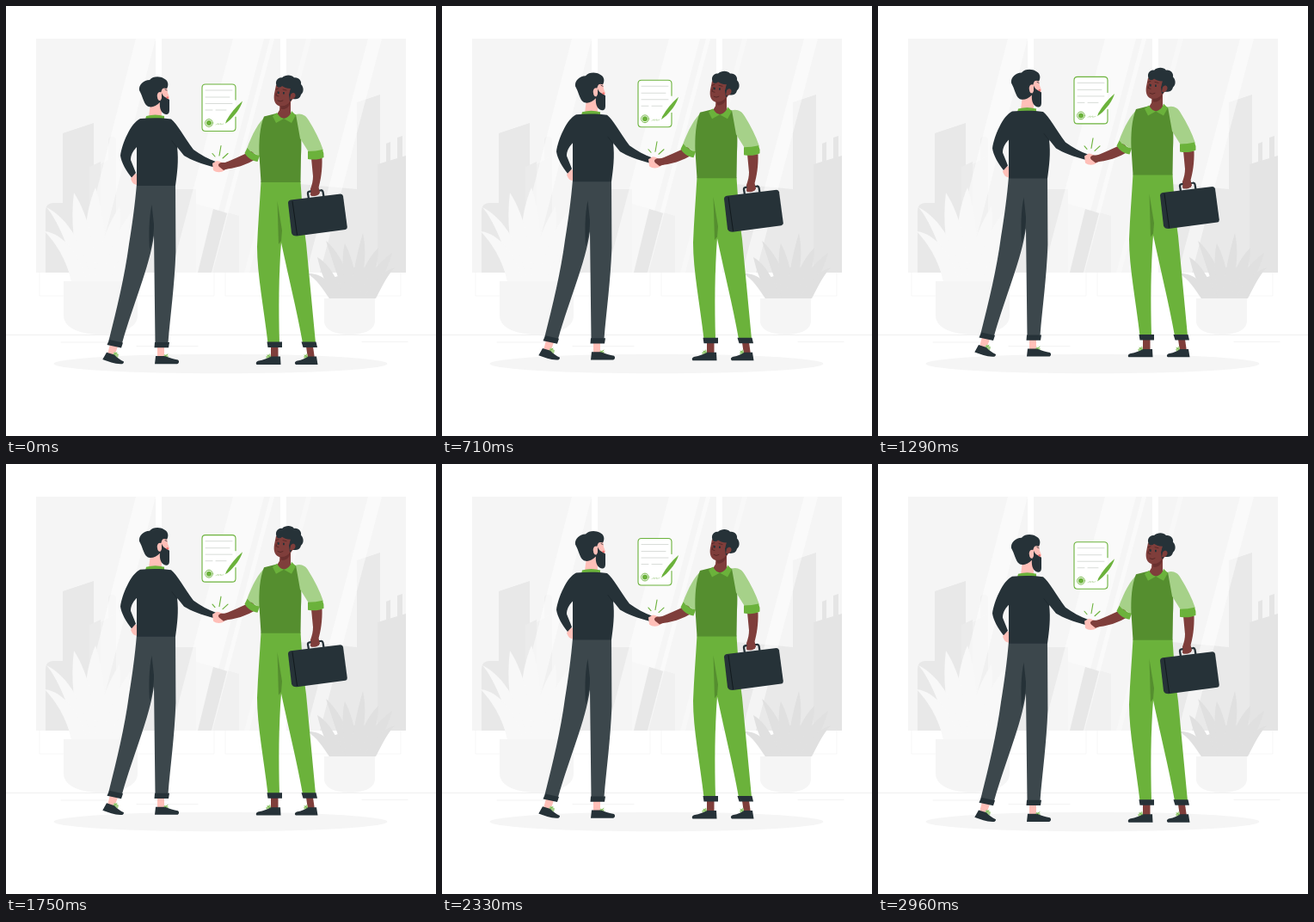
Animation of 500 by 500 pixels, one loop 3 s. Source, as an HTML page:

```html
<!DOCTYPE html>
<html lang="en">
<head>
<meta charset="utf-8">
<title>Handshake</title>
<style>
  html, body { margin: 0; width: 100%; height: 100%; overflow: hidden; background: #fff; }
  svg { display: block; width: 100%; height: 100%; }
  .dark { fill: #263238; }
  .green { fill: #6bb23b; }
  .moss { fill: #558e2f; }
  .pale { fill: #a6d189; }
  .pink { fill: #ffbfb8; }
  .brown { fill: #7f3e3b; }
  .slate { fill: #3c474c; }
  .line { fill: none; stroke-linecap: round; stroke-linejoin: round; }
</style>
</head>
<body>
<svg viewBox="0 0 500 500">
  <defs><clipPath id="pane"><rect x="35" y="38" width="430" height="272"/></clipPath></defs>

  <g clip-path="url(#pane)">
    <rect x="35" y="38" width="430" height="272" fill="#f5f5f5"/>
    <g fill="#ebebeb">
      <path d="M66 148L102 136V310H66Z" fill="#e8e8e8"/>
      <path d="M97 187L110 181V310H97Z"/>
      <path d="M119 155Q119 152 123.500 152Q128 152 128 155V310H119Z" fill="#f0f0f0"/>
      <path d="M46 238Q46 229 56 229H104V310H46Z" fill="#e8e8e8"/>
      <path d="M110 184L128 174V310H110Z" fill="#f0f0f0"/>
      <path d="M160 213H221V310H160Z"/>
      <path d="M221 230L271 244V310H221Z" fill="#f0f0f0"/>
      <path d="M342 207L408 213V310H342Z" fill="#e9e9e9"/>
      <path d="M408 112L435 103V310H408Z" fill="#e9e9e9"/>
      <path d="M442 160L447 158V310H442ZM455 153L461 151V310H455Z" fill="#e5e5e5"/>
      <path d="M432 184L465 174V310H432Z" fill="#e4e4e4"/>
    </g>
    <g fill="#fff" opacity=".5">
      <path d="M151 38H174L104 310H81Z"/>
      <path d="M264 38H300L228 310H192Z"/>
      <path d="M307 38H312L240 310H235Z"/>
      <path d="M349 38H355L283 310H277Z" opacity=".5"/>
      <path d="M421 38H437L365 310H349Z"/>
    </g>
    <path d="M241 236L257 241L239 310H223Z" fill="#e7e7e7"/>
    <path d="M174 38H181V310H174ZM319 38H326V310H319Z" fill="#fff"/>
  </g>

  <g class="line" stroke="#f5f5f5" stroke-width=".8">
    <path d="M39 310V337H242V310M255 310V337H459V310"/>
    <path d="M0 382.500H500" stroke="#ebebeb"/>
    <path d="M64 391H118M152 395.500H223M414 390.500H467" stroke="#f0f0f0"/>
  </g>

  <g fill="#f8f8f8">
    <path d="M67 320H153V360C153 375 132 382 110 382S67 375 67 360Z" fill="#f5f5f5"/>
    <path d="M76 320L70 296L90 284L104 264L120 278L138 288L146 320Z"/>
    <path d="M98 320C88 276 92 239 104 211C114 241 119 279 111 320Z"/>
    <path d="M91 320C78 285 75 249 79 217C96 244 105 282 104 320Z"/>
    <path d="M84 320C76 290 62 251 47 234C73 247 92 281 99 320Z"/>
    <path d="M76 320C70 294 58 276 45 262C69 265 86 292 94 320Z"/>
    <path d="M104 320C106 280 121 250 132 233C136 263 127 294 117 320Z"/>
    <path d="M113 320C118 282 135 248 154 232C148 264 142 293 130 320Z"/>
    <path d="M121 320C130 288 148 271 174 263C161 280 150 300 143 320Z"/>
  </g>

  <path d="M370 340H429V366C429 377 416 382 399.500 382S370 377 370 366Z" fill="#f5f5f5"/>
  <g fill="#e0e0e0">
    <path d="M376 340L368 320L386 314L400 304L424 304L434 314L428 340Z"/>
    <path d="M388 340C378 319 365 310 350 311C362 318 368 329 376 340Z"/>
    <path d="M393 340C385 315 375 300 362 292C366 309 371 325 384 340Z"/>
    <path d="M395 340C386 317 379 294 372 273C388 287 401 313 404 340Z"/>
    <path d="M397 340C391 315 390 290 394 276C404 295 408 317 407 340Z"/>
    <path d="M400 340C403 313 408 287 415 264C421 291 414 319 410 340Z"/>
    <path d="M405 340C409 316 420 294 433 281C433 302 425 325 417 340Z"/>
    <path d="M409 340C418 317 431 300 449 287C443 308 432 328 423 340Z"/>
    <path d="M417 340C424 322 436 309 452 304C442 315 436 329 430 340Z"/>
  </g>
  <ellipse cx="249.500" cy="416" rx="194" ry="11.300" fill="#f5f5f5"/>

  <g id="scene">
    <g class="line" stroke="#6bb23b" stroke-width="1.100">
      <path d="M267 109V95Q267 91 263 91H232Q228 91 228 95V141.500Q228 145.500 232 145.500H263Q267 145.500 267 141.500V129" fill="#fff"/>
      <path d="M248 174L250 162.500M243 175L240 171.500M252 177L258 171.500"/>
      <circle cx="236" cy="136" r="4.400" stroke-width=".9"/>
    </g>
    <circle class="green" cx="236" cy="136" r="3"/>
    <g class="line" stroke="#d4d8d4" stroke-width=".9">
      <path d="M232 98H263M232 106H260M232 113.500H263M232 121H240M244 121H256"/>
      <path d="M244 138L247 136.500L246.500 138L250 136.500L249.500 138L253 137" stroke="#b9d9a5" stroke-width=".7"/>
    </g>
    <path class="green" d="M275 110.500C273 118 266 128 258 134.500L255 136.700L256.300 133C261 125 267 117 275 110.500Z"/>

    <g id="left-man">
      <path class="pink" d="M121 393L118 405L126 407L130 396ZM176 396H184V409H176ZM149 194L145 201C147 206 149 208 153 208V196Z"/>
      <path class="pale" d="M126 402L131 405L130 409L124 406ZM184 405L189 407L187 411H182Z"/>
      <path class="dark" d="M117 402.700L126 405.500C129 409 133 411.500 137 413.500C137 415.500 136 416.500 133 416.300C126 416 119 413.500 112.300 411Z"/>
      <path class="dark" d="M174 407H185C190 409.500 195 410.500 200 411.500C202 413.500 201 415.500 199 416.200H173Z"/>
      <path class="line" d="M126 405L129 403M185 407L188 405" stroke="#6bb23b" stroke-width=".9"/>
      <path class="slate" d="M152 207H197L197.400 286C196 325 191 360 188.500 392H173.500L172 267C167 303 148 346 135 392L119.500 389C129 352 138 314 143 277C147 252 150 230 152 207Z"/>
      <path class="dark" d="M169.500 231C166 248 166 266 167 284C171 270 172 264 172 254Z"/>
      <path class="dark" d="M120 388L136 391.500L134 397.500L117.500 394ZM173 391H190L189 397.300H172.500Z"/>
      <path class="pink" d="M168 113H181V130C176 132 170 131 166 129Z"/>
      <path class="green" d="M163 128C170 126 177 126 184 128V132H162Z"/>
      <path class="dark" d="M156 131C168 130 182 130 192 131.500C199 137 207 152 218 167C226 173 236 178 244 181L242 187.500C228 184 215 179 207 174L199 164C201 180 199 195 197 209H152V164C147 169 145 174 145 179L151 194L146 199.500C140 192 134 182 133 174C135 160 145 136 156 131Z"/>
      <path class="line" d="M193 157L199 165" stroke="#1c262b" stroke-width=".7"/>
      <path class="pink" d="M175 92H187L188 101L190 106L187 116L176 119Z"/>
      <path class="dark" d="M155 98C154 92 160 86 167 86C171 81 180 82 183 84C188 86 190 91 187 96C184 95 182 95 181 98L179 104V112C174 117 168 119 164 116C160 113 159 105 155 98Z"/>
      <path class="dark" d="M181 101L179 111C178 120 181 125 186 126C189 126 190 124 190 121V109L187 107C184 106 182 104 181 101Z"/>
      <path class="pink" d="M181 101C178 98 175 102 176 106C176 110 180 112 181 107Z"/>
      <path class="line" d="M185 97L187 98" stroke="#263238" stroke-width=".8"/>
      <circle cx="187.700" cy="106.500" r="1.200" fill="#ee6c6c"/>
    </g>

    <g id="right-man">
      <path class="brown" d="M308 396H316.500V410H308ZM349 396H357L359 410H351Z"/>
      <path class="pale" d="M302 408L307 404L309 410H303ZM346 408L350 404L352 410H347Z"/>
      <path class="dark" d="M308 407.500H319L319.500 416.950H291.500C290 415.500 291 413 294 412.500C299 411.500 304 410 308 407.500Z"/>
      <path class="dark" d="M351 407.500H361L362.500 416.950H337C335 415.500 336 413 339 412.500C344 411.500 348 410 351 407.500Z"/>
      <path class="line" d="M307 408L304 406M350 408L347 406" stroke="#6bb23b" stroke-width=".9"/>
      <path class="green" d="M296.500 204H342.500C344 228 346 254 349 276L360 392H345C338 353 328 313 320 275C317 313 317 353 318 392H304.500C300 352 292 312 292 280C293 254 295 230 296.500 204Z"/>
      <path class="moss" d="M315.500 227L317 277L320 273L321 261Z"/>
      <path class="dark" d="M303.500 390.500H321V397H304.500ZM343.500 390.500H360.500L362 397H345.500Z"/>
      <path class="brown" d="M286 168L292 177C280 185 266 189 252 190L249 184C261 180 274 174 286 168ZM355 177H367.500C368 190 366 203 363 213L364 219L355 221L354 213C356 207 357 203 357 198Z"/>
      <path class="pale" d="M302 128C294 135 286 149 280 166L295 175L300 154Z"/>
      <path class="green" d="M280.500 165C285 170 290 173 295 174L292.500 181C286 180 280 176 277.500 171Z"/>
      <path class="moss" d="M300 128.500L314 125H332L340 127C343 141 344 157 343 174L342.500 205H296.500L294.500 174C294 157 295 141 300 128.500Z"/>
      <path class="pale" d="M337 126C343 124 349 127 352 133C359 144 365 156 369 168L352 170L342 154Z"/>
      <path class="green" d="M351 169C357 169 363 168 368 167Q370 171 369.500 176C364 179 357 179 351 178Z"/>
      <path class="brown" d="M319 109L331 107L331 126C326 132 319 132 315 126L318 121Z"/>
      <path class="green" d="M315 124C318 129 321 131 324 131C329 129 331 126 332 122L337 127L332 136L323 131L314 136L310 128Z"/>
      <path class="brown" d="M314 92L334 89L337 103L332 110C329 116 322 119 317 116C312 114 311 108 312 102Z"/>
      <path d="M319 116C323 117 328 115 330 111C331 116 326 121 320 120Z" fill="#6a302f"/>
      <path class="dark" d="M315 93.300C312 88 316 82.300 321 83.300C325 79.500 332 79.500 335 83.300C340 82.300 344 87 343 91C347 95 346 101 343 103C342 108 337 109 333 108L330 111L329 103C330 100 330 98 331 96C326 96 323 94 321 93C319 95 316 95 315 93.300Z"/>
      <path class="brown" d="M331 103C334 99 338 102 336 106C334 109 331 109 330 108Z"/>
      <path class="line" d="M314 97L317 96M322 97L326 98M316 99L314 104L317 105M316 110Q319 112 322 110" stroke="#4f2423" stroke-width=".8"/>
      <path class="dark" d="M316 99.500H317.800V102H316ZM322 100H323.800V102.500H322Z"/>

      <path class="line" d="M352 224L351 218Q351 216 353 215.700L366 214.300Q368 214 368.500 216L369.500 222" stroke="#263238" stroke-width="2.300"/>
      <path class="dark" d="M331 225.500L389 218.500Q391.500 218.500 392 221L396.800 257Q397 259.500 394.500 260L338 267.500Q333 267.500 332 264L328 229Q328 226 331 225.500Z"/>
      <path class="line" d="M333 227L338.500 266" stroke="#11191d" stroke-width="1"/>
      <path class="brown" d="M355 211H363.500L365 217C363 221 358 222 354 220Z"/>
    </g>

    <path class="pink" d="M240 183L245 180C249 180 253 183 256 187L254 191C250 194 245 194 241 191Z"/>
    <path class="brown" d="M257 182L250 182C247 183 246 185 248 187L253 191L258 189Z"/>
  </g>
</svg>
<script>
  const PERIOD = 3000;
  const LIFT = 10;
  const scene = document.getElementById('scene');
  const start = performance.now();

  function render(time) {
    const phase = (time % PERIOD) / PERIOD;
    const y = -LIFT * (1 - Math.abs(1 - 2 * phase));
    scene.setAttribute('transform', `translate(0 ${y.toFixed(3)})`);
  }

  function tick(now) {
    render(Math.max(0, now - start));
    requestAnimationFrame(tick);
  }

  render(0);
  requestAnimationFrame(tick);
</script>
</body>
</html>
```
